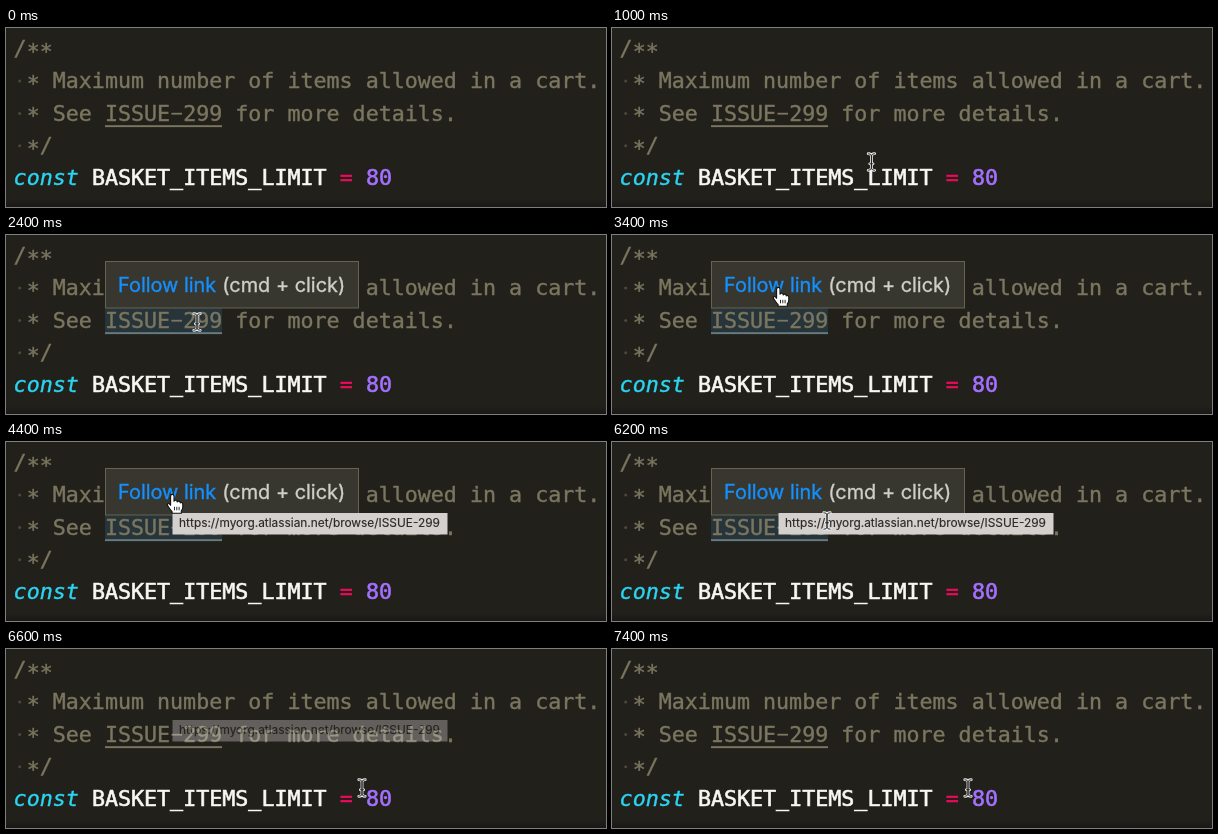
An HTML page that plays this animation: 600x179 px, repeating every 7.6 s.

```html
<!DOCTYPE html>
<html lang="en">
<head>
<meta charset="utf-8">
<title>Issue link hover</title>
<style>
  html, body { margin: 0; width: 100%; height: 100%; overflow: hidden; background: #22201b; }
  svg { display: block; width: 600px; height: 179px; }
  text { white-space: pre; }
  .code text { font: 21.67px "DejaVu Sans Mono", monospace; stroke-width: .4; }
  .comment { fill: #7b765f; stroke: #7b765f; }
  .code .keyword { fill: #2bd5f2; stroke: #2bd5f2; font-style: italic; }
  .code .name { fill: #f8f8f2; stroke: #f8f8f2; stroke-width: .65; }
  .code .sign { fill: #f0085f; stroke: #f0085f; }
  .code .number { fill: #a470ff; stroke: #a470ff; stroke-width: .6; }
  .ui { font-family: Inter, sans-serif; }
</style>
</head>
<body>
<svg viewBox="0 0 600 179">
  <defs>
    <linearGradient id="edge" x1="0" y1="0" x2="0" y2="1">
      <stop offset="0" stop-color="#191815" stop-opacity="0"/>
      <stop offset="1" stop-color="#191815"/>
    </linearGradient>
    <path id="ibeam" d="M-3.2-8.3Q0-8.3 0-6V6Q0 8.3-3.2 8.3M3.2-8.3Q0-8.3 0-6V6Q0 8.3 3.2 8.3M-1.6 1.8H1.6"/>
  </defs>
  <rect width="600" height="179" fill="#22201b"/>
  <rect y="171" width="600" height="8" fill="url(#edge)"/>
  <rect id="mark" x="99" y="73" width="117" height="25" fill="#27353a"/>

  <g class="code">
    <g class="comment">
      <text x="7.6" y="28.1">/<tspan dy="2.5">**</tspan></text>
      <text x="20.65" y="60.4"><tspan dy="2.5">*</tspan><tspan dy="-2.5"> Maximum number of items allowed in a cart.</tspan></text>
      <text x="20.65" y="92.8"><tspan dy="2.5">*</tspan><tspan dy="-2.5"> See ISSUE</tspan><tspan fill="none" stroke="none">-</tspan>299 for more details.</text>
      <text x="20.65" y="125.1"><tspan dy="2.5">*</tspan><tspan dy="-2.5">/</tspan></text>
      <rect x="165.4" y="84.8" width="10.6" height="1.8" stroke="none"/>
      <rect id="line" x="99" y="97.2" width="117" height="1.9" stroke="none"/>
    </g>
    <g fill="#4b483c">
      <circle cx="13.7" cy="53" r="1.5"/>
      <circle cx="13.7" cy="85.4" r="1.5"/>
      <circle cx="13.7" cy="117.7" r="1.5"/>
    </g>
    <text class="keyword" x="7.6" y="157.3">const</text>
    <text class="name" x="85.9" y="157.3">BASKET_ITEMS_LIMIT</text>
    <text class="sign" x="333.8" y="157.3">=</text>
    <text class="number" x="359.9" y="157.3">80</text>
  </g>

  <g id="popup" class="ui" font-size="19.9">
    <rect x="99.5" y="26.5" width="253" height="46.5" fill="#38372f" stroke="#66634f"/>
    <g stroke-width=".35">
      <text x="112" y="57" fill="#1490ff" stroke="#1490ff">Follow link</text>
      <text x="216.3" y="57" fill="#cfcfca" stroke="#cfcfca">(cmd + click)</text>
    </g>
  </g>

  <g id="tip" class="ui" font-size="11.88">
    <rect x="166.5" y="71" width="275" height="21.5" fill="#d4d0ce"/>
    <text x="173.1" y="85" fill="#2a2926" stroke="#2a2926" stroke-width=".15">https://myorg.atlassian.net/browse/ISSUE-299</text>
  </g>

  <g id="beam" fill="none" stroke-linecap="round" stroke-linejoin="round">
    <use href="#ibeam" stroke="#f4f4f4" stroke-width="2.8"/>
    <use href="#ibeam" stroke="#1a1a1a" stroke-width=".9"/>
  </g>

  <g id="hand" fill="#fff" stroke="#111" stroke-width="1.1" stroke-linejoin="round">
    <path d="M-1.7 1Q-1.6-.9 0-.9T1.7 1V6Q2 4.7 3.5 5Q4.8 5.2 4.9 6.6Q5.5 5.5 6.9 6Q7.9 6.4 8 7.6Q8.8 6.8 9.8 7.5Q10.5 8 10.5 9.4V12Q10.3 14 9 15.5V18H-.2V16.4Q-2 14.4-3.2 12.4L-4.8 10.1Q-5.3 8.8-4.2 8.2Q-3.2 7.9-1.7 10Z"/>
    <path d="M2.2 11.5V15M4.5 11.5V15M6.8 11.5V15" fill="none" stroke-width=".9"/>
  </g>
</svg>

<script>
const LOOP = 7600, TICK = 200;
const el = id => document.getElementById(id);
const mark = el('mark'), line = el('line'), popup = el('popup'), tip = el('tip');
const beam = el('beam'), hand = el('hand');

// [time, x, y] of the pointer's hot spot
const path = [
  [400, 302, 146], [1400, 231, 126], [1600, 204, 98], [1800, 191, 87],
  [2600, 191, 87], [3000, 179, 68], [3400, 166.3, 53.3],
  [6000, 166.3, 53.3], [6200, 215, 79], [6400, 300, 116], [6600, 356, 139]
];
const popupFade = [[2000, 0], [2200, .6], [2400, 1], [6200, 1], [6400, 0]];
const tipFade = [[4200, 0], [4400, 1], [6400, 1], [6600, .36], [6800, 0]];

function at(keys, t) {
  const i = keys.findIndex(k => k[0] > t);
  if (i < 0) return keys[keys.length - 1].slice(1);
  if (i === 0) return keys[0].slice(1);
  const a = keys[i - 1], b = keys[i], p = (t - a[0]) / (b[0] - a[0]);
  return a.slice(1).map((v, n) => v + (b[n + 1] - v) * p);
}

const show = (node, on) => node.setAttribute('opacity', Number(on));

function draw(ms) {
  const t = Math.floor(ms % LOOP / TICK) * TICK;
  const [x, y] = at(path, t);
  const pointing = t >= 3200 && t < 6200;
  const hovered = t >= 2200 && t < 6400;
  for (const node of [beam, hand]) node.setAttribute('transform', `translate(${x} ${y})`);
  show(hand, pointing);
  show(beam, t >= 400 && !pointing);
  show(mark, hovered);
  line.setAttribute('fill', hovered ? '#667c80' : '#7b765f');
  show(popup, at(popupFade, t)[0]);
  show(tip, at(tipFade, t)[0]);
}

const start = performance.now();
function loop() {
  draw(performance.now() - start);
  requestAnimationFrame(loop);
}
loop();
</script>
</body>
</html>
```
